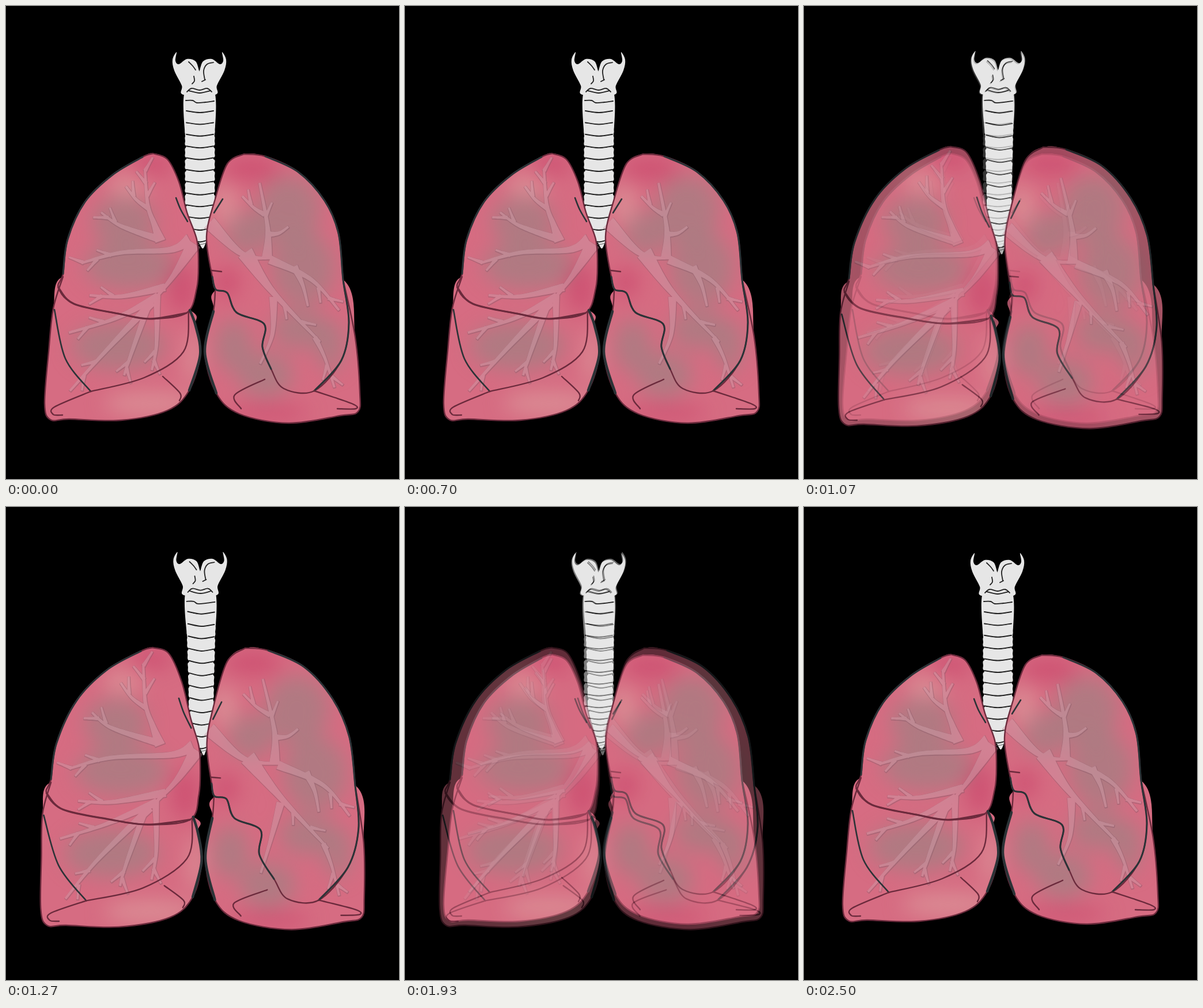
An HTML page for the animation above (2530 ms loop, 682 by 821 pixels).

```html
<!DOCTYPE html>
<html lang="en">
<head>
<meta charset="utf-8">
<title>Breathing lungs</title>
<style>
html, body { margin: 0; width: 100%; height: 100%; overflow: hidden; background: #000; }
svg { position: absolute; inset: 0; width: 100%; height: 100%; display: block; }
</style>
</head>
<body>
<script>
const W = 682, H = 821, LOOP = 2530, MID = 340;
const WINE = '#6b2a3c', SLATE = '#2b3337', INK = '#202020', BONE = '#e6e6e6';

const bell = (v, width) => Math.exp(-((v / width) ** 2));
const ramp = (v, from, to) => {
  const t = Math.max(0, Math.min(1, (v - from) / (to - from)));
  return t * t * (3 - 2 * t);
};
const mix = (a, b, t) => a + (b - a) * t;
const fix = n => +n.toFixed(1);
const points = s => s.trim().split(/\s+/).map(p => p.split(',').map(Number));

// Full breath: the sides swell, the tops rise, the bases sink, the windpipe narrows
const rest = p => p;
function inhale([x, y]) {
  if (y < 172) return [x + 1.5, y - 2 * ramp(y, 172, 130)];
  const side = Math.sign(x - MID), d = Math.abs(x - MID);
  const outer = ramp(d, 20, 170);
  const swell = outer * (4 + 17 * bell(y - 460, 170));
  const pinch = 4.5 * (1 - outer) * ramp(y, 150, 350) * Math.min(1, d / 25);
  const fissure = 18 * bell(Math.hypot(x - 440, y - 565), 45);
  const core = Math.min(10, (y - 172) / 20);
  const lung = 20 * ramp(y, 255, 455) - 12 + 9 * bell(y - 650, 55) * Math.sin(Math.PI * d / 275);
  return [x + 2 * (1 - outer) + side * (swell - pinch) - fissure, y + mix(core, lung, ramp(d, 20, 60))];
}

// Smooth path through the points
function curve(pts, closed) {
  const n = pts.length;
  const at = i => closed ? pts[(i + n) % n] : pts[Math.max(0, Math.min(n - 1, i))];
  let d = 'M' + pts[0].map(fix);
  for (let i = 0; i < (closed ? n : n - 1); i++) {
    const [a, b, c, e] = [at(i - 1), at(i), at(i + 1), at(i + 2)];
    const c1 = b.map((v, k) => fix(v + (c[k] - a[k]) / 6));
    const c2 = c.map((v, k) => fix(v - (e[k] - b[k]) / 6));
    d += `C${c1} ${c2} ${c.map(fix)}`;
  }
  return d + (closed ? 'Z' : '');
}

// Tapered branch around a centre line
function limb(pts, w0, w1) {
  const last = pts.length - 1, left = [], right = [];
  pts.forEach(([x, y], i) => {
    const a = pts[Math.max(0, i - 1)], b = pts[Math.min(last, i + 1)];
    const turn = Math.atan2(b[1] - a[1], b[0] - a[0]) + Math.PI / 2;
    const r = mix(w0, w1, Math.sqrt(i / last)) / 2;
    const nx = r * Math.cos(turn), ny = r * Math.sin(turn);
    left.push([x + nx, y + ny]);
    right.unshift([x - nx, y - ny]);
  });
  return curve(left) + curve(right).replace('M', 'L') + 'Z';
}

// A branch with short twigs on alternating sides of its last stretch
function sprig(pts, width, twigs) {
  const list = [[pts, width, 4]];
  const [[ax, ay], [bx, by]] = pts.slice(-2);
  const heading = Math.atan2(by - ay, bx - ax);
  for (let i = 0; i < twigs; i++) {
    const t = .25 + .35 * i, turn = heading + (i % 2 ? -.6 : .6);
    const x = mix(ax, bx, t), y = mix(ay, by, t);
    const step = r => [x + r * Math.cos(turn), y + r * Math.sin(turn)];
    list.push([[[x, y], step(14), step(27)], 7, 3.5]);
  }
  return list;
}

const outlines = {
  leftBack: `99,470 82,525 74,600 67,690 77,718 110,717 200,719 280,702 318,667 337,605 329,555 319,528 200,480`,
  rightBack: `363,494 360,530 345,600 365,672 405,708 490,724 580,711 611,704 614,670 606,575 585,475 450,450`,
  leftFront: `255,256 280,266 300,305 314,358 331,405 334,445 331,490 313,533 250,543 195,534 118,517 91,489
    99,465 107,405 137,340 185,293 237,262`,
  rightFront: `413,257 384,274 363,335 348,400 358,470 364,492 384,498 400,532 448,552 445,592 460,630 482,664
    535,668 582,615 595,550 585,475 577,395 553,338 507,288 450,261`
};
const lobes = Object.fromEntries(Object.entries(outlines).map(([k, s]) => [k, points(s)]));
const { leftBack, rightBack, leftFront, rightFront } = lobes;

const strokes = [
  [WINE, 2.4, leftBack.slice(0, -1), rightBack.slice(0, -1), [...leftFront, leftFront[0]], [...rightFront, rightFront[0]]],
  [WINE, 3.2, leftFront.slice(7, 12)],
  [SLATE, 3, leftFront.slice(12), rightFront.slice(4, 11), rightFront.slice(12)],
  [SLATE, 4.5, leftBack.slice(8, 12), rightBack.slice(1, 4)],
  [SLATE, 2.6, ...['84,527 103,612 147,669', '295,333 303,353 315,374', '376,335 361,359'].map(points)],
  [WINE, 2.4, ...['147,669 240,645 308,600 317,530', '147,669 84,696 82,709 98,710', '272,643 302,672 301,685',
    '535,668 600,690 607,699 575,699', '449,648 397,675 408,699', '357,459 374,461'].map(points)]
];

// Soft tints: centre and radii
const tints = {
  '#a87d82': `205,375 55,45 215,450 80,42 195,590 82,42 490,355 55,60 515,455 55,65 420,395 40,38
    395,590 32,45 450,640 48,40 510,560 50,35 562,590 24,45`,
  '#dc9499': `212,312 35,20 380,345 22,36 324,610 14,50 250,690 80,20`,
  '#cc4c6e': `255,275 35,18 425,282 50,20 383,480 22,26 305,490 24,45 455,706 70,12`
};

// width and twig count: centre line
const bronchi = {
  left: `24 0:326,412 292,466 254,514
    18 3:268,408 257,378 246,345 241,283
    9 1:248,352 226,336 208,313
    13 2:264,404 198,381 165,358
    20 3:318,405 285,423 200,428 131,446
    14 2:276,488 200,504 145,502
    14 2:264,504 190,542 109,567
    14 2:254,514 172,600 111,668
    11 2:246,522 215,610 205,641
    12 2:262,502 261,588 253,632`,
  right: `24 0:353,376 410,430 462,438
    18 1:453,437 454,385 440,307
    9 1:449,362 430,350 410,330
    10 0:456,396 474,394 490,383
    15 2:458,440 530,475 578,528
    13 0:500,452 515,485 524,521
    28 2:415,428 462,495 545,583
    9 2:536,575 553,610 570,662
    14 0:464,505 462,570 441,621`
};
const branches = Object.values(bronchi).join('\n').split('\n').flatMap(row => {
  const [size, line] = row.trim().split(':');
  return sprig(points(line), ...size.split(' ').map(Number));
});

const mirror = pts => pts.map(([x, y]) => [671 - x, y]).reverse();
const halfLarynx = points('335,112 329,96 314,92 300,101 294,95 296,80 289,93 292,112 305,138 308,154');
const larynx = [...halfLarynx, ...mirror(halfLarynx)];
const gristle = ['317,97 324,104 329,111', '323,135 327,130 326,122', '360,98 349,101 343,112 345,128', '340,131 346,128',
  '314,149 322,143 336,146 349,143 357,149', '317,147 336,151 355,147', '312,164 324,164 331,168 346,167 361,165'].map(points);

const RINGS = 12, PITCH = 20.4;
function ring(i) {
  const y = 164 + i * PITCH, shrink = Math.max(0, i - 9) * 5;
  const l = 312 + shrink, r = 361 - shrink;
  const bow = (dy, sag) => [[l + 1, y + dy], [(l + r) / 2, y + dy + sag], [r - 1, y + dy]];
  return {
    body: [...bow(0, 2), [r + 1, y + 9], ...bow(18, 4).reverse(), [l - 1, y + 9]],
    seam: bow(18, 3),
    crease: bow(22.5, 3)
  };
}

function drawing(id, move) {
  const place = pts => pts.map(move);
  const path = (d, attrs = '') => `<path d="${d}" ${attrs}/>`;
  const fill = (pts, c) => path(curve(place(pts), true), `fill="${c}"`);
  const line = (pts, c, w) => path(curve(place(pts)), `fill="none" stroke="${c}" stroke-width="${w}"`);

  let pipe = fill(points('311,146 313,260 314,350 336,413 346,413 360,350 360,260 361,146'), BONE);
  for (let i = 0; i < RINGS; i++) {
    const { body, seam, crease } = ring(i);
    pipe += fill(body, BONE) + line(seam, INK, 2) + line(crease, '#555', 1);
  }

  const lung = Object.values(lobes).map(pts => path(curve(place(pts), true))).join('');
  let soft = '';
  for (const [c, s] of Object.entries(tints)) {
    const list = points(s);
    for (let i = 0; i < list.length; i += 2) {
      const [x, y] = move(list[i]).map(fix), [rx, ry] = list[i + 1];
      soft += `<ellipse cx="${x}" cy="${y}" rx="${rx}" ry="${ry}" fill="${c}" opacity=".8"/>`;
    }
  }
  const twigs = branches.map(([pts, a, b]) => path(limb(place(pts), a, b))).join('');

  return `<clipPath id="${id}">${lung}</clipPath>
    <rect width="${W}" height="${H}"/>
    ${fill(larynx, BONE)}${pipe}${gristle.map(pts => line(pts, INK, 1.8)).join('')}
    <g fill="#d66c82">${lung}</g>
    <g clip-path="url(#${id})"><g filter="url(#soft)">${soft}</g></g>
    <g opacity=".42">
      <g fill="#875867" stroke="#875867" stroke-width="2" transform="translate(.4 .8)">${twigs}</g>
      <g fill="#d0a0ac">${twigs}</g>
    </g>
    ${strokes.map(([c, w, ...list]) => list.map(pts => line(pts, c, w)).join('')).join('')}`;
}

document.body.innerHTML = `<svg viewBox="0 0 ${W} ${H}" stroke-linecap="round" stroke-linejoin="round">
  <filter id="soft" x="0" y="0" width="${W}" height="${H}" filterUnits="userSpaceOnUse"
    color-interpolation-filters="sRGB"><feGaussianBlur stdDeviation="17"/></filter>
  <g>${drawing('out', rest)}</g>
  <g id="full" opacity="0">${drawing('in', inhale)}</g>
</svg>`;

const fade = [[0, 0], [800, 0], [1150, 1], [1750, 1], [2085, 0], [LOOP, 0]];
document.getElementById('full').animate(
  fade.map(([t, opacity]) => ({ offset: t / LOOP, opacity })),
  { duration: LOOP, iterations: Infinity }
);
</script>
</body>
</html>
```
